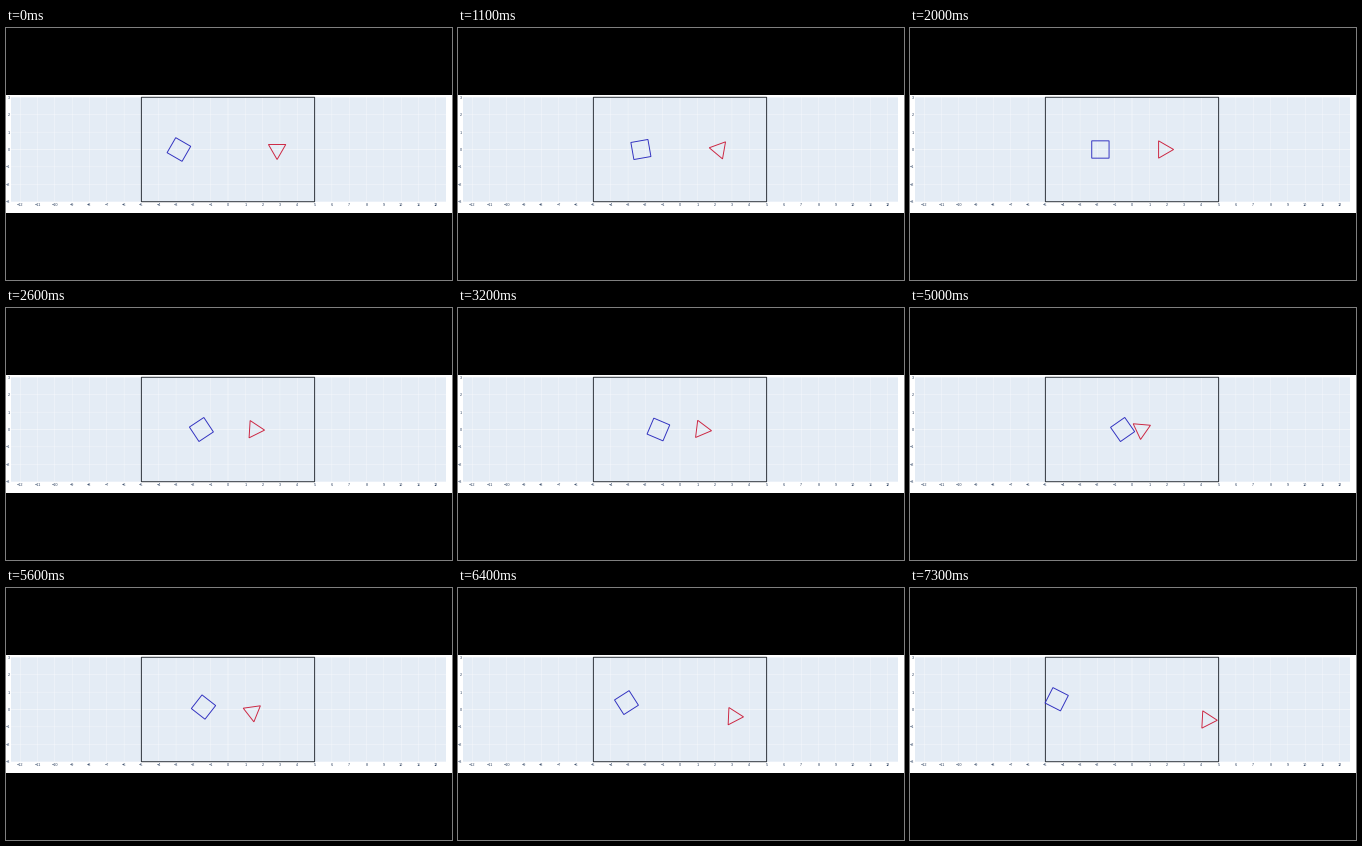
Write a matplotlib script that moves like this. It is 446x252 px and loops after 7400 ms.

```python
import numpy as np
import matplotlib.pyplot as plt
from matplotlib.animation import FuncAnimation
from matplotlib.patches import Polygon, Rectangle

W, H, DPI = 446, 252, 100
FRAMES, STEP = 74, 100
UX, UY = 17.32, 17.4      # pixels per data unit
CX, CY = 222, 121.5       # pixel position of the data origin
LEFT, RIGHT, TOP, BOTTOM = 4.5, 440, 69, 174

# Spin (degrees) over frames; the spin also serves as the motion clock.
SPIN_T = [0, 11, 20, 32, 43, 56, 70]
SPIN = [0, 220, 390, 637, 840, 1072, 1353]
HIT = 984                 # spin at which the two shapes collide
GAP_AT = [0, 220, 390, 637, 840, HIT, 1072, 1353]
GAP = [49.1, 39.1, 31.6, 21.6, 14, 8.7, 24.5, 75.3]
DRIFT = 0.0278            # sideways pixels per degree after the hit


def px(width):
    return width * 72 / DPI


fig = plt.figure(figsize=(W / DPI, H / DPI), dpi=DPI, facecolor="black")
ax = fig.add_axes([0, 0, 1, 1])
ax.set_xlim(0, W)
ax.set_ylim(H, 0)
ax.axis("off")


def box(x0, y0, x1, y1, **style):
    ax.add_patch(Rectangle((x0, y0), x1 - x0, y1 - y0, **style))


def grid_line(xs, ys, width):
    ax.plot(xs, ys, color="white", lw=px(width), snap=False,
            solid_capstyle="butt", zorder=2)


def label(x, y, value, align):
    text = str(value).replace("-", "\u2212")
    ax.text(x, y, text, ha=align, va="center_baseline", color="#2a3f5f",
            fontsize=px(3.7), family="Liberation Sans", zorder=3)


box(0, 66.5, W, 185, fc="white", ec="none", zorder=0)
box(LEFT, TOP, RIGHT, BOTTOM, fc="#e4ecf5", ec="none", zorder=1)

for v in range(-12, 13):
    x = CX + v * UX
    grid_line([x, x], [TOP, BOTTOM], 0.45 if v == 0 else 0.3)
    label(x, 176.8, v, "center")
for v in range(-3, 4):
    y = CY - v * UY
    grid_line([LEFT, RIGHT], [y, y], 0.45 if v == 0 else 0.3)
    label(3.9, y, v, "right")

box(CX - 5 * UX, CY - 3 * UY, CX + 5 * UX, CY + 3 * UY,
    fc="none", ec="#30363e", lw=px(1), snap=False, zorder=4)


def outline(color):
    patch = Polygon(np.zeros((3, 2)), closed=True, fc="none", ec=color,
                    lw=px(0.95), joinstyle="miter", snap=False, zorder=5)
    return ax.add_patch(patch)


square = outline("#3030c0")
triangle = outline("#cc2440")


def regular(n, x, y, angle):
    """Corners of a regular polygon whose side is one data unit."""
    radius = UX / (2 * np.sin(np.pi / n))
    a = np.radians(angle) + 2 * np.pi * np.arange(n) / n
    return np.column_stack([x + radius * np.cos(a), y + radius * np.sin(a)])


def update(i):
    spin = np.interp(i, SPIN_T, SPIN)
    gap = np.interp(spin, GAP_AT, GAP)
    drift = DRIFT * max(0, spin - HIT)
    square.set_xy(regular(4, CX - gap, CY - drift, 75 - spin))
    triangle.set_xy(regular(3, CX + gap, CY + drift, 90 + spin))
    return square, triangle


anim = FuncAnimation(fig, update, frames=FRAMES, interval=STEP,
                     init_func=lambda: update(0), repeat=True,
                     repeat_delay=0, blit=False)
plt.show()
```
